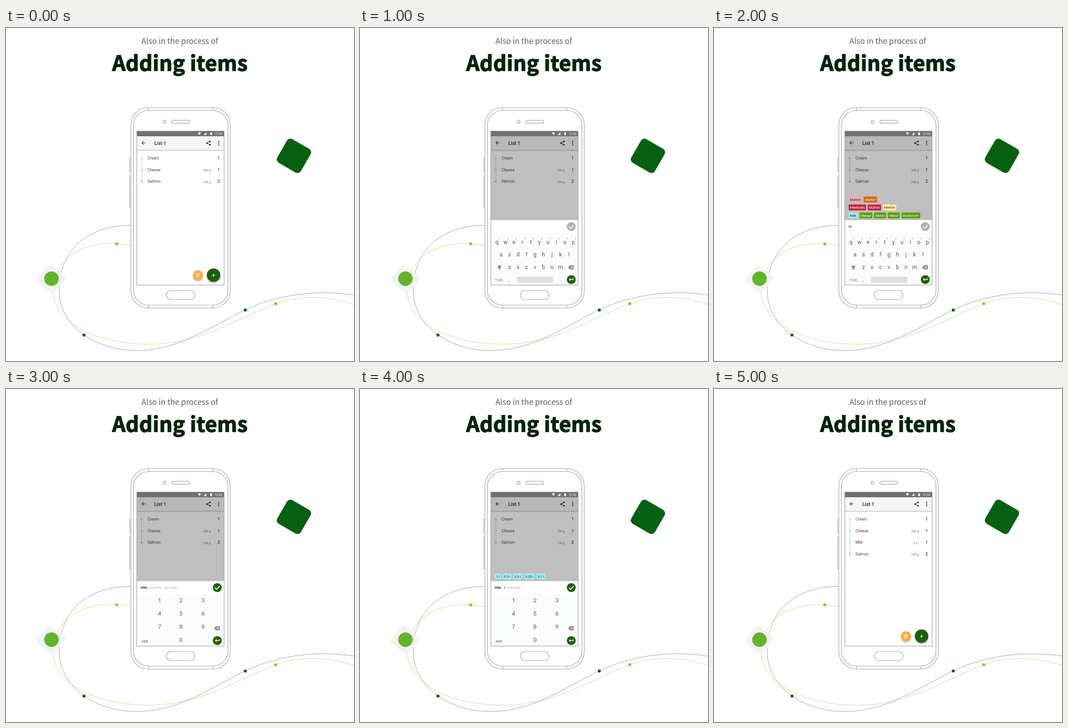
An HTML page for the animation above (6000 ms loop, 765x732 px).

```html
<!DOCTYPE html>
<html lang="en">
<head>
<meta charset="utf-8">
<title>Adding items</title>
<style>
  html, body { margin: 0; width: 100%; height: 100%; overflow: hidden; background: #fff; }
  svg { display: block; width: 765px; height: 732px; font-family: Roboto, sans-serif; }
  .heading { font-family: "Noto Sans CJK SC", "Noto Sans CJK JP", "Noto Sans CJK", sans-serif; text-anchor: middle; }
  .title { font-size: 45.5px; font-weight: 900; letter-spacing: .4px; fill: #02240d; stroke: #02240d; stroke-width: 1.5; }
  .outline { fill: none; stroke: #a0a0a0; stroke-width: 1.2; }
  .middle { text-anchor: middle; }
  .end { text-anchor: end; }
</style>
</head>
<body>
<svg viewBox="0 0 765 732">
  <defs>
    <filter id="shadow" x="-40%" y="-40%" width="180%" height="190%">
      <feDropShadow dx="0" dy="2" stdDeviation="1.5" flood-opacity=".35"/>
    </filter>
  </defs>

  <text class="heading" x="382" y="35" font-size="17.2" fill="#5e5e5e">Also in the process of</text>
  <text class="heading title" x="382.5" y="93.5">Adding items</text>

  <g fill="none">
    <path stroke="#c9de8d" d="M274 479C205 464 150 483 122 520C108 540 102 565 104 586C112 650 200 695 315 695C430 695 510 637 593 606C645 587 710 588 765 608"/>
    <path stroke="#7fb08a" d="M274 434C186 434 117 482 117 577C117 650 190 709 288 709C396 709 480 633 560 605.5C630 581.5 695 577 765 587"/>
  </g>
  <g fill="#8bc92b"><circle cx="243.5" cy="474.5" r="3.3"/><circle cx="593" cy="606" r="3.3"/></g>
  <g fill="#005a14"><circle cx="171.5" cy="675" r="3.3"/><circle cx="526" cy="620" r="3.3"/></g>

  <rect x="-24" y="-24" width="48" height="48" rx="7" fill="#f3f3f3" transform="translate(99 551.5) rotate(40)"/>
  <circle cx="100" cy="551" r="16" fill="#62b52a"/>
  <rect x="-30" y="-30" width="60" height="60" rx="9" fill="#066012" transform="translate(633 281) rotate(30)"/>

  <g class="outline">
    <rect x="274.5" y="175" width="218.5" height="440.5" rx="38" fill="#fff"/>
    <rect x="280" y="181.5" width="208" height="427.5" rx="33"/>
    <path d="M313.5 175v6.5M454.5 175v6.5M313.5 609v6.5M454.5 609v6.5M274.5 287h-2.5v28h2.5M274.5 325h-2.5v70h2.5"/>
    <circle cx="348.5" cy="206" r="3.4"/>
    <rect x="364.5" y="202.8" width="39.5" height="6.6" rx="3.3"/>
    <rect x="352.5" y="577" width="63" height="20" rx="10"/>
  </g>
  <g id="screen"></g>
  <rect class="outline" x="287.5" y="226.5" width="192" height="338.5"/>
</svg>

<script>
const GREEN = '#1f6108', LOOP = 6000, STEP = 1000;
const screen = document.getElementById('screen');

const text = (x, y, size, fill, str, extra = '') =>
  `<text x="${x}" y="${y}" font-size="${size}" fill="${fill}" ${extra}>${str}</text>`;
const rect = (x, y, w, h, fill, rx = 0) =>
  `<rect x="${x}" y="${y}" width="${w}" height="${h}" rx="${rx}" fill="${fill}"/>`;
const circle = (x, y, r, fill, extra = '') =>
  `<circle cx="${x}" cy="${y}" r="${r}" fill="${fill}" ${extra}/>`;
const line = (d, stroke, width) =>
  `<path d="${d}" fill="none" stroke="${stroke}" stroke-width="${width}"/>`;
const centered = (x, y, size, fill, str) => text(x, y, size, fill, str, 'class="middle"');

function topBars() {
  return rect(287.5, 226, 192, 12, '#6f7271')
    + '<path d="M422 230.2q3.3-1.8 6.6 0l-3.3 5zM434.5 235.2h6v-6zM449 230.3h1v-1h2v1h1v5h-4z" fill="#fff"/>'
    + text(458.3, 234.8, 6.9, '#fff', '12:30')
    + rect(287.5, 268, 192, 1.5, '#c4c4c4') + rect(287.5, 269.5, 192, 1.5, '#ececec')
    + rect(287.5, 238, 192, 30, '#f5f5f5')
    + line('M307 252.5h-8M302.7 248.6l-3.9 3.9l3.9 3.9', '#333', 1.2)
    + text(326, 256.7, 10.7, '#222', 'List 1', 'font-weight="500"')
    + line('M448.5 249.2l-7 3.8l7 3.8', '#222', 1.1)
    + circle(448.5, 249.2, 1.7, '#222') + circle(441.8, 253, 1.7, '#222') + circle(448.5, 256.8, 1.7, '#222')
    + [249.2, 253, 256.8].map(y => circle(467.5, y, 1.2, '#222')).join('');
}

function list(items) {
  const rowY = i => 286 + i * 25.6;
  const last = items.length - 1;
  return line(`M298.5 ${rowY(0)}V${rowY(last)}`, '#a5eaf6', 1.3)
    + items.map(([name, amount, count], i) => {
      const y = rowY(i);
      return circle(298.5, y + .4, 2.2, i < last ? '#9be6f4' : '#f3a5a5')
        + text(311, y + 3, 8.6, '#444', name)
        + text(450, y + 3.3, 6.5, '#777', amount, 'class="end"')
        + text(470, y + 3.1, 8.8, '#333', count, 'class="end" font-weight="500"');
    }).join('');
}

const buttons = () =>
  circle(422, 543.5, 11, '#ffab43', 'filter="url(#shadow)"')
  + line('M417.5 540h9M417.5 542.4h9M417.5 544.8h9M417.5 547.2h6', '#fff', 1.1)
  + circle(456.3, 543.3, 14.8, GREEN, 'filter="url(#shadow)"')
  + line('M452.6 543.5h7.4M456.3 539.8v7.4', '#fff', 1.2);

const entryBar = (content, ready) =>
  rect(287.5, 238, 192, 184.5, 'rgba(0,0,0,.25)')
  + rect(287.5, 422.5, 192, 27, '#fff')
  + rect(287.5, 449.5, 192, 115.5, '#fafcfb')
  + text(296, 438.9, 7.4, '#222', content)
  + circle(464.4, 436.5, 9.8, ready ? GREEN : '#b1b1b1')
  + line('M459.3 436.8l3.5 3.5l6.8-7', '#fff', 1.9)
  + circle(464.4, 553, 9.8, GREEN)
  + line('M468.8 549.8v3.2h-8.2M463 550.4l-2.7 2.6l2.7 2.6', '#fff', 1.3)
  + '<path d="M457.8 526l3.4-4.5h8.8v9h-8.8z" fill="#858b8b"/>'
  + line('M463.3 523.8l4.4 4.4M467.7 523.8l-4.4 4.4', '#fff', 1.1);

function letterKeys() {
  const row = (letters, x, y) => [...letters].map((c, i) => centered(x + i * 18.68, y, 12, '#555', c)).join('');
  return row('qwertyuiop', 301, 475) + row('asdfghjkl', 310, 502) + row('zxcvbnm', 328.7, 530)
    + [...'1234567890'].map((c, i) => centered(306 + i * 18.68, 465, 5, '#777', c)).join('')
    + '<path d="M306.5 520.5l5 5.2h-2.7v3.2h-4.6v-3.2h-2.7zM304.2 530h4.6v1.2h-4.6z" fill="#858b8b"/>'
    + text(297, 556.6, 7.8, '#555', '?123')
    + centered(328.3, 556.5, 11, '#555', ',') + centered(441.3, 556.5, 11, '#555', '.')
    + rect(345, 547, 80, 13, '#dde0e0', 1);
}

const numberKeys = () =>
  [...'1234567890'].map((c, i) => {
    const col = c === '0' ? 1 : i % 3;
    return centered([337.5, 384.5, 433][col], 469 + Math.floor(i / 3) * 28.9, 13.6, '#606060', c);
  }).join('') + text(298, 556.5, 7.5, '#555', 'АБВ');

// Each chip: left edge, width, label, fill, text colour.
const chips = (y, items) => items.map(([x, w, label, fill, ink = '#fff']) =>
  rect(x, y - 6.6, w, 13.2, fill, 1.8) + centered(x + w / 2, y + 2.7, 7.4, ink, label)).join('');

const suggestions = () => {
  const red = '#c7253e', green = '#5a9e0c', ink = '#222';
  return chips(377, [[296, 29.5, 'Mutton', '#f4abab', ink], [329.3, 29, 'Mutton', '#cf6709']])
    + chips(394.5, [[296, 38.3, 'Meatballs', red], [338, 29.3, 'Mutton', red], [371.3, 29.3, 'Mutton', '#fff09b', ink]])
    + chips(412, [[296, 20, 'Milk', '#9eeef7', ink], [320, 28, 'Mango', green], [352, 26, 'Melon', green],
      [382, 26, 'Maize', green], [412, 41.3, 'Mushroom', green]]);
};
const packages = () => chips(412,
  [[296, 13.8, '1 l'], [313.5, 19.5, '0.5 l'], [337, 19.3, '0.3 l'], [360.3, 23.6, '0.25 l'], [388, 19.5, '0.1 l']]
    .map(chip => [...chip, '#9eeef7', '#222']));

const strong = s => `<tspan font-weight="500">${s}</tspan>`;
const hint = s => `<tspan fill="#b8b8b8"> ${s}</tspan>`;
const before = [['Cream', '', 1], ['Cheese', '200 g', 1], ['Salmon', '250 g', 2]];
const after = [...before.slice(0, 2), ['Milk', '0.5 l', 1], before[2]];

const base = topBars() + list(before);
const scenes = [
  base + buttons(),
  base + entryBar('', false) + letterKeys(),
  base + entryBar('M', false) + letterKeys() + suggestions(),
  base + entryBar(strong('Milk :') + hint('quantity : package'), true) + numberKeys(),
  base + entryBar(strong('Milk : 1 :') + hint('package'), true) + numberKeys() + packages(),
  topBars() + list(after) + buttons()
];

let shown = -1;
function draw() {
  const index = Math.floor(performance.now() % LOOP / STEP);
  if (index !== shown) screen.innerHTML = scenes[shown = index];
  requestAnimationFrame(draw);
}
draw();
</script>
</body>
</html>
```
